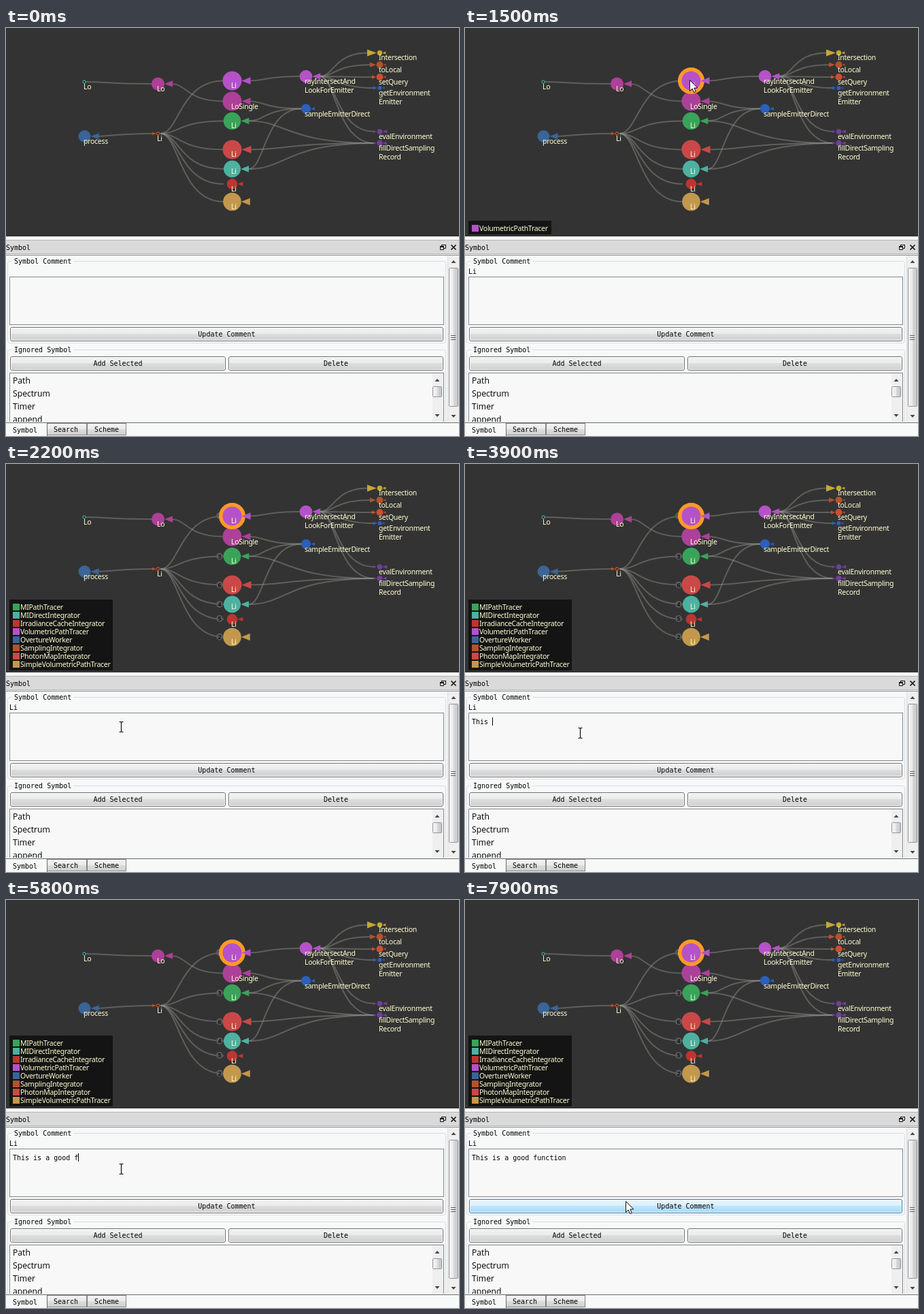
An HTML page for the animation above (8000 ms loop, 666 by 599 pixels).

```html
<!DOCTYPE html>
<html lang="en">
<head>
<meta charset="utf-8">
<title>Symbol graph</title>
<style>
  html, body { margin: 0; width: 666px; height: 599px; overflow: hidden; background: #f7f8f8; }
  svg { display: block; }
  text { white-space: pre; }
  .node, .legend { font: 10.5px "Noto Sans", "Open Sans", sans-serif; letter-spacing: -.28px; fill: #ffffd2; }
  .mono { font: 10px "DejaVu Sans Mono", monospace; fill: #000; }
  .item { font: 12.2px "Open Sans", "Noto Sans", sans-serif; fill: #000; }
  .badge { font: bold 9px "Noto Sans", sans-serif; fill: #161616; text-anchor: middle; }
  .mid { text-anchor: middle; }
  .edge { fill: none; stroke: rgba(150, 150, 142, .45); stroke-width: 2; }
  .group { fill: none; stroke: #d3dde4; }
  .field { fill: #f8f8f9; stroke: #828790; }
  .btn { fill: url(#face); stroke: #707070; }
  .shine { fill: none; stroke: #fbfbfb; }
  .hot .btn { fill: url(#glow); stroke: #3c7fb1; }
  .hot .shine { stroke: #e6f6fe; }
  .tab { fill: url(#face); stroke: #858585; }
  .thumb { fill: url(#side); stroke: #959595; }
</style>
</head>
<body>
<svg id="stage" width="666" height="599" viewBox="0 0 666 599">
  <defs>
    <linearGradient id="face" x2="0" y2="1">
      <stop offset="0" stop-color="#f2f2f2"/><stop offset=".48" stop-color="#ebebeb"/>
      <stop offset=".5" stop-color="#dddddd"/><stop offset="1" stop-color="#cfcfcf"/>
    </linearGradient>
    <linearGradient id="glow" x2="0" y2="1">
      <stop offset="0" stop-color="#eaf6fd"/><stop offset=".48" stop-color="#d9f0fc"/>
      <stop offset=".5" stop-color="#bee6fd"/><stop offset="1" stop-color="#a7d9f5"/>
    </linearGradient>
    <linearGradient id="side">
      <stop offset="0" stop-color="#f5f5f5"/><stop offset=".48" stop-color="#e9e9eb"/>
      <stop offset=".5" stop-color="#d9dadc"/><stop offset="1" stop-color="#c4c5c8"/>
    </linearGradient>
    <clipPath id="listClip"><path d="M6 507H627V578H6Z"/></clipPath>
  </defs>

  <rect width="666" height="306" fill="#333"/>
  <g id="graph">
    <g id="edges"></g>
    <g id="badges"></g>
    <g id="nodes"></g>
    <g id="labels"></g>
  </g>
  <g id="legendOne" class="legend"></g>
  <g id="legendAll" class="legend"></g>

  <rect y="306" width="666" height="293" fill="#f7f8f8"/>
  <rect x="-.5" y="311.5" width="667" height="20" fill="#dadada" stroke="#b4b4b4"/>
  <path d="M0 333.5H666" stroke="#828790"/>
  <g fill="none" stroke="#111">
    <path d="M640.5 320V318.5H646.5V323.5H644M640 318.5H647M638.5 320.5H643.5V325.5H638.5Z"/>
    <path d="M638 321H644" stroke-width="2"/>
    <path d="M654.5 318.5L661.5 325.5M661.5 318.5L654.5 325.5" stroke-width="1.7"/>
  </g>
  <text class="mono" x="0" y="326">Symbol</text>

  <rect class="group" x="2.5" y="342.5" width="644" height="120" rx="3"/>
  <rect class="group" x="2.5" y="472.5" width="644" height="120" rx="3"/>
  <path d="M9 338H99V348H9ZM9 468H99V478H9Z" fill="#f7f8f8"/>
  <text class="mono" x="12" y="346">Symbol Comment</text>
  <text class="mono" x="12" y="476">Ignored Symbol</text>
  <text class="mono" x="5" y="361" id="picked">Li</text>
  <rect class="field" x="5.5" y="365.5" width="638" height="70"/>
  <text class="mono" x="10" y="382" id="typed"></text>
  <rect id="caret" width="1" y="372" height="12"/>
  <g id="buttons"></g>

  <rect class="field" x="5.5" y="506.5" width="638" height="90"/>
  <g id="items" class="item" clip-path="url(#listClip)"></g>
  <rect x="627" y="507" width="16" height="71" fill="#efefef"/>
  <rect class="thumb" x="627.5" y="526.5" width="13" height="15" rx="1"/>
  <rect x="650" y="334" width="16" height="245" fill="#efefef"/>
  <path d="M649.5 334V579" stroke="#dcdcdc"/>
  <rect class="thumb" x="651.5" y="352.5" width="13" height="203" rx="1"/>
  <path d="M654 451.5H661M654 454.5H661M654 457.5H661" stroke="#606060"/>
  <path d="M630.5 519L634 515L637.5 519ZM630.5 567L634 571L637.5 567ZM654.5 345L658 341L661.5 345ZM654.5 568L658 572L661.5 568Z" fill="#444"/>

  <rect y="578" width="666" height="21" fill="#f7f8f8"/>
  <rect class="tab" x="60.5" y="580.5" width="58" height="17"/>
  <rect class="tab" x="119.5" y="580.5" width="57" height="17"/>
  <path d="M0 579.5H666M60.5 579V599" stroke="#6d6d6d"/>
  <text class="mono" x="10" y="594">Symbol</text>
  <text class="mono" x="70" y="593">Search</text>
  <text class="mono" x="130" y="593">Scheme</text>

  <path id="arrow" d="M.5 .5V16.5L4.2 13L6.8 18.6L9.3 17.5L6.8 12H11.8Z" fill="#fff" stroke="#111"/>
  <path id="beam" d="M-3 -7.5H-1L0 -6.5L1 -7.5H3M0 -6.5V6.5M-3 7.5H-1L0 6.5L1 7.5H3" fill="none" stroke="#111" stroke-width="1.2"/>
</svg>
<script>
const $ = id => document.getElementById(id);

function add(parent, tag, attrs, text) {
  const el = document.createElementNS("http://www.w3.org/2000/svg", tag);
  for (const k in attrs) el.setAttribute(k, attrs[k]);
  if (text) el.textContent = text;
  return $(parent).appendChild(el);
}

const violet = "#b552c9", plum = "#ad4098", green = "#39a35a", red = "#cb4848",
      teal = "#4db1a1", crimson = "#bd3531", tan = "#c3984d", blue = "#3b6497",
      royal = "#2d5fbc", rust = "#b2532d", gold = "#c3a735", orange = "#cd4f32", purple = "#703f97";

// Triangle with its tip at x; a positive length puts the base on the right.
const wedge = (x, y, len, half, fill) =>
  add("nodes", "path", { d: `M${x} ${y}l${len} ${-half}v${2 * half}Z`, fill });

function node(x, y, r, fill, len, label, lx, ly) {
  add("nodes", "circle", { cx: x, cy: y, r, fill });
  if (len) wedge(x + r, y, len, len * .4, fill);
  label.split("\n").forEach((s, i) =>
    add("labels", "text", { class: "node", x: lx, y: ly + 13 * i }, s));
}

// Both handles sit near the caller, so the curve turns early and arrives flat.
function edge(x1, y1, x2, y2) {
  const m = x1 + (x2 - x1) * .3;
  add("edges", "path", { class: "edge", d: `M${x1} ${y1}C${m} ${y1} ${m} ${y2} ${x2} ${y2}` });
}

edge(117, 79, 215, 82);
edge(243, 82, 319, 107.5);
edge(134, 159, 216, 155);
[77.5, 136.5, 178.5, 207, 229, 255].forEach(y => edge(227, 155, 320, y));
edge(358, 77.5, 432, 71);
[107.5, 136.5, 207].forEach(y => edge(357, y, 434, 118.5));
[136.5, 178.5, 207].forEach(y => edge(357, y, 542, 169));
[[532, 36.5], [536, 54], [539, 72], [542, 88], [542, 152], [542, 169]].forEach(p => edge(461, 71, ...p));

add("nodes", "circle", { cx: 115, cy: 79, r: 2, fill: "#222", stroke: "#3f9088", "stroke-width": 1.4 });
node(115, 79, 0, teal, 0, "Lo", 114, 90);
node(115.5, 159, 9, blue, 12, "process", 114, 170);
node(223.5, 82, 9.5, plum, 12, "Lo", 222, 93);
add("nodes", "circle", { cx: 223.5, cy: 155, r: 2, fill: "#222", stroke: rust, "stroke-width": 1.4 });
wedge(221, 155, -6, 2.3, rust);
node(223.5, 155, 0, rust, 0, "Li", 222, 166);

node(332.5, 107.5, 14, plum, 13, "LoSingle", 331, 119);
node(332.5, 136.5, 12.8, green, 12, "Li", 331, 147);
node(332.5, 178.5, 14, red, 14, "Li", 331, 189);
node(332.5, 207, 12.5, teal, 12, "Li", 331, 214);
node(332.5, 229, 7.8, crimson, 8, "Li", 331, 240);
node(332.5, 255, 13.3, tan, 13, "Li", 331, 266);
add("nodes", "circle", { id: "ring", cx: 332.5, cy: 77.5, r: 19.5, fill: "#ff9a26" });
node(332.5, 77.5, 14, violet, 13, "Li", 331, 88);

node(441, 71, 9.3, violet, 12, "rayIntersectAnd\nLookForEmitter", 439, 82);
node(441, 118.5, 7, royal, 6, "sampleEmitterDirect", 439, 130);
node(549.5, 36.5, 3.8, gold, 5, "Intersection", 548, 47);
node(549.5, 54, 5, rust, 4, "toLocal", 548, 65);
node(549.5, 72, 5, orange, 4, "setQuery", 548, 83);
node(549.5, 88, 3, royal, 4, "getEnvironment\nEmitter", 548, 99);
node(549.5, 152, 3.8, purple, 7, "evalEnvironment", 548, 163);
node(549.5, 169, 4.2, purple, 6, "fillDirectSampling\nRecord", 548, 180);
wedge(545, 36.5, -14, 5, gold);
wedge(544, 54, -9, 3.6, rust);
wedge(544, 72, -6, 2.8, orange);
wedge(546, 88, -6, 2.5, royal);
wedge(545, 152, -5, 2, purple);
wedge(545, 169, -5, 2, purple);

[[1, 77], [3, 136.5], [6, 178.5], [4, 207], [5, 228], [2, 254.5]].forEach(([n, y]) => {
  add("badges", "circle", { cx: 314, cy: y, r: 5, fill: "#5a5a5a" });
  add("badges", "text", { class: "badge", x: 314, y: y + 3.3 }, n);
});

function legend(id, width, rows) {
  const height = 8 + 12 * rows.length;
  add(id, "rect", { x: 5, y: 303 - height, width, height, fill: "#141414" });
  rows.forEach(([name, fill], i) => {
    const y = 294 - 12 * (rows.length - 1 - i);
    add(id, "rect", { x: 10, y: y - 5, width: 10, height: 10, fill });
    add(id, "text", { x: 21, y: y + 4 }, name);
  });
}
const selected = ["VolumetricPathTracer", violet];
legend("legendOne", 122, [selected]);
legend("legendAll", 152, [
  ["MIPathTracer", green], ["MIDirectIntegrator", teal], ["IrradianceCacheIntegrator", crimson],
  selected, ["OvertureWorker", blue], ["SamplingIntegrator", rust],
  ["PhotonMapIntegrator", red], ["SimpleVolumetricPathTracer", tan]
]);

function button(id, x, y, w, label) {
  add("buttons", "g", { id });
  add(id, "rect", { class: "btn", x: x + .5, y: y + .5, width: w - 1, height: 20, rx: 2.5 });
  add(id, "rect", { class: "shine", x: x + 1.5, y: y + 1.5, width: w - 3, height: 18, rx: 1.5 });
  add(id, "text", { class: "mono mid", x: x + w / 2, y: y + 14 }, label);
}
button("update", 6, 439, 637, "Update Comment");
button("append", 6, 482, 317, "Add Selected");
button("remove", 327, 482, 316, "Delete");
["Path", "Spectrum", "Timer", "append"].forEach((s, i) => add("items", "text", { x: 10, y: 522 + 19 * i }, s));

const comment = "This is a good function";
// Time at which each character is in place.
const keys = [3100, 3600, 3700, 3900, 3900, 4200, 4400, 4500, 4600, 4800, 4900, 5100,
              5400, 5500, 5600, 5800, 5900, 6100, 6200, 6500, 6600, 6700, 6800];
const caretOff = [[0, 2500], [3000, 3100], [3500, 3600], [4000, 4200], [5000, 5100],
                  [6400, 6500], [6900, 7400], [7900, 8000]];
// Pointer: time, x, y, shape.
const track = [
  [300, 597, 29, "arrow"], [400, 560, 48, "arrow"], [500, 500, 68, "arrow"], [600, 432, 82, "arrow"],
  [700, 380, 86, "arrow"], [800, 348, 82, "arrow"], [900, 334, 78, "arrow"], [1000, 330, 76, "arrow"],
  [2000, 252, 190, "arrow"], [2100, 167, 337, "arrow"], [2200, 169.5, 386, "beam"], [2300, 169.5, 395, "beam"],
  [7600, 182, 405, "beam"], [7700, 208, 423, "beam"], [7800, 230, 439, "arrow"], [7900, 236, 442, "arrow"]
];

const show = (id, on) => $(id).setAttribute("visibility", on ? "visible" : "hidden");
const within = (t, a, b) => t >= a && t < b;

function draw(now) {
  const t = Math.floor((now % 8000) / 100) * 100;
  show("ring", t >= 900);
  show("picked", t >= 1500);
  show("legendOne", within(t, 1500, 1700));
  show("legendAll", t >= 1700);
  show("badges", t >= 1700);
  $("graph").setAttribute("transform", `translate(0 ${within(t, 2100, 5000) ? -1 : 0})`);

  const n = keys.filter(k => k <= t).length;
  $("typed").textContent = comment.slice(0, n);
  $("caret").setAttribute("x", 10 + 6 * n);
  $("caret").setAttribute("y", n ? 372 : 370);
  $("caret").setAttribute("height", n ? 12 : 14);
  show("caret", !caretOff.some(([a, b]) => within(t, a, b)));

  const [, x, y, shape] = track.filter(p => p[0] <= t).pop() || [];
  for (const id of ["arrow", "beam"]) {
    show(id, id === shape);
    if (id === shape) $(id).setAttribute("transform", `translate(${x} ${y})`);
  }
  $("update").setAttribute("class", t >= 7800 ? "hot" : "");
}

const start = performance.now();
function tick() {
  draw(performance.now() - start);
  requestAnimationFrame(tick);
}
tick();
</script>
</body>
</html>
```
